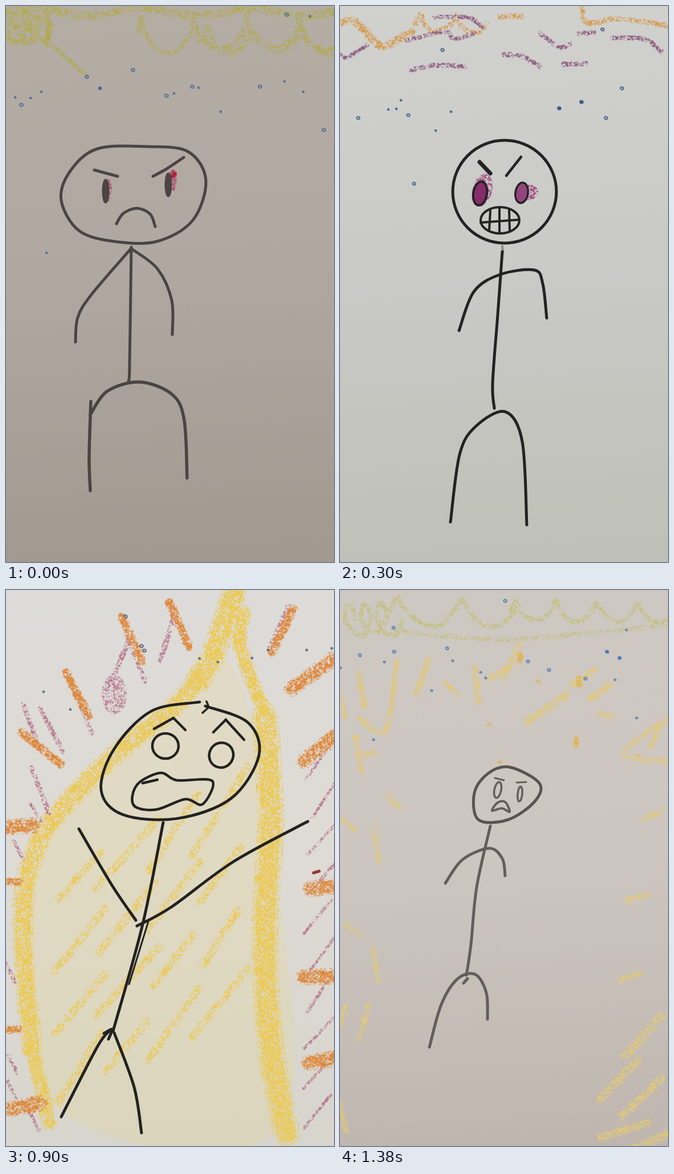
An HTML page with a canvas for the animation above (1.5 s loop, 576 by 973 pixels).

```html
<!DOCTYPE html>
<html lang="en">
<head>
<meta charset="utf-8">
<title>Angry stick figure</title>
<style>
html, body { margin: 0; width: 100%; height: 100%; overflow: hidden; background: #b0a8a0; }
canvas { position: absolute; left: 0; top: 0; width: 576px; height: 973px; opacity: 0; }
</style>
</head>
<body>
<script>
const W = 576, H = 973, HOLD = 300, TILE = 160;
let ctx;

// Seeded paper tooth, blurred once so that it tiles
let seed = 7;
const random = () => (seed = seed * 16807 % 2147483647) / 2147483647;
const raw = Array.from({ length: TILE * TILE }, random);
const tooth = raw.map((_, i) => {
  const x = i % TILE, y = (i - x) / TILE;
  let sum = 0;
  for (let dy = 0; dy < 3; dy++)
    for (let dx = 0; dx < 3; dx++)
      sum += raw[(y + dy) % TILE * TILE + (x + dx) % TILE];
  return sum / 9 - 0.5;
});

function grain(color, density) {
  const tile = document.createElement('canvas');
  tile.width = tile.height = TILE;
  const c = tile.getContext('2d');
  const image = c.createImageData(TILE, TILE);
  const rgb = [1, 3, 5].map(i => parseInt(color.slice(i, i + 2), 16));
  tooth.forEach((n, i) => {
    const alpha = Math.max(0, Math.min(1, density + n * 4));
    image.data.set([...rgb, alpha * 255], i * 4);
  });
  c.putImageData(image, 0, 0);
  return ctx.createPattern(tile, 'repeat');
}

const numbers = text => text.match(/-?[\d.]+/g).map(Number);

function pairs(text) {
  const n = numbers(text);
  return n.filter((_, i) => i % 2 === 0).map((x, i) => [x, n[i * 2 + 1]]);
}

// Smooth curve through points; a trailing z closes it
function curve(text) {
  const closed = text.endsWith('z');
  const p = pairs(text), size = p.length;
  const at = i => closed ? p[(i + size) % size] : p[Math.max(0, Math.min(size - 1, i))];
  const path = new Path2D();
  path.moveTo(...p[0]);
  for (let i = 0; i < (closed ? size : size - 1); i++) {
    const [a, b, c, d] = [at(i - 1), at(i), at(i + 1), at(i + 2)];
    path.bezierCurveTo(
      b[0] + (c[0] - a[0]) / 6, b[1] + (c[1] - a[1]) / 6,
      c[0] - (d[0] - b[0]) / 6, c[1] - (d[1] - b[1]) / 6, ...c);
  }
  if (closed) path.closePath();
  return path;
}

function ink(style, width, ...lines) {
  ctx.strokeStyle = style;
  ctx.lineWidth = width;
  ctx.lineCap = ctx.lineJoin = 'round';
  lines.forEach(line => ctx.stroke(curve(line)));
}

function wax(color, width, density, ...lines) {
  ink(grain(color, density * 0.3), width * 1.2, ...lines);
  ink(grain(color, density), width * 0.85, ...lines);
}

// Parallel crayon marks around the given centres
function hatch(color, width, density, length, degrees, centres) {
  const lines = pairs(centres).map(([x, y]) => {
    const a = (degrees + random() * 12 - 6) * Math.PI / 180;
    const dx = Math.cos(a) * length / 2, dy = Math.sin(a) * length / 2;
    return `${x - dx} ${y - dy} ${x + dx} ${y + dy}`;
  });
  wax(color, width, density, ...lines);
}

// Wavy crayon line that doubles back on itself
function scribble(color, width, density, x, y, length, height, waves) {
  const steps = waves * 6;
  const points = Array.from({ length: steps + 1 }, (_, i) => {
    const a = i / 6 * Math.PI * 2;
    const px = x + length * i / steps + Math.cos(a) * height * 0.5;
    return `${px} ${y - Math.sin(a) * height * (0.7 + random() * 0.5)}`;
  });
  wax(color, width, density, points.join(' '));
}

function oval(x, y, rx, ry, tilt, width, line, fill) {
  ctx.beginPath();
  ctx.ellipse(x, y, rx, ry, tilt, 0, 7);
  if (fill) { ctx.fillStyle = fill; ctx.fill(); }
  if (!width) return;
  ctx.strokeStyle = line;
  ctx.lineWidth = width;
  ctx.stroke();
}

const smudge = (color, density, x, y, rx, ry, tilt = 0) =>
  oval(x, y, rx, ry, tilt, 0, '', grain(color, density));

function dots(color, size, centres, fill = color + '40') {
  pairs(centres).forEach(([x, y]) => oval(x, y, size, size * 0.85, 0.4, 1.5, color, fill));
}

function paper(...colors) {
  const g = ctx.createLinearGradient(0, 0, 60, H);
  colors.forEach((c, i) => g.addColorStop(i / (colors.length - 1), c));
  ctx.fillStyle = g;
  ctx.fillRect(0, 0, W, H);
}

function frown() {
  const pen = '#4a4443', green = '#b0aa50', blue = '#49699c';
  paper('#b4ada4', '#b0a8a0', '#a29a91');
  scribble(green, 14, 0.28, 0, 10, W, 8, 3);
  scribble(green, 12, 0.45, 0, 36, 66, 25, 3);
  scribble(green, 9, 0.28, 215, 45, 370, 34, 4);
  scribble(green, 12, 0.18, 330, 60, 250, 22, 3);
  wax(green, 12, 0.5, '70 0 74 66');
  wax(green, 7, 0.45, '80 68 142 122');
  dots(blue, 3.2, '142 124 223 112 282 157 327 141 27 173 446 141 558 217 493 15');
  dots(blue, 1.6, '16 160 43 161 62 150 295 153 338 143 377 185 489 132 522 150 534 18 71 432');
  dots(blue, 2.8, '165 144', blue);
  ink(pen, 5, '160 250 250 246 320 255 351 305 328 375 265 412 190 412 128 393 97 340 112 290z');
  ink(pen, 5, '155 287 196 298', '258 298 282 285 312 265', '194 381 206 363 230 354 253 364 262 386');
  smudge('#b04a6c', 0.5, 180, 322, 6, 20);
  smudge('#b04a6c', 0.5, 294, 305, 6, 18);
  smudge('#a8203f', 0.95, 294, 294, 6, 8);
  oval(175, 324, 5, 20, 0, 3, pen, pen);
  oval(285, 313, 5, 20, 0, 3, pen, pen);
  ink(pen, 5, '220 422 217 630 215 656', '220 424 150 505 126 545 122 588', '222 426 266 460 291 515 292 575');
  ink(pen, 5.5, '149 692 146 790 148 848', '148 715 178 674 235 658 292 680 313 725 318 826');
}

function teeth() {
  const pen = '#222322', purple = '#8d5a80', orange = '#d59a4e', blue = '#39608f';
  paper('#d1d1ce', '#c9cac6', '#bfc0b8');
  wax(orange, 13, 0.55, '0 30 22 25 45 45 75 70 125 45');
  scribble(orange, 9, 0.4, 125, 32, 125, 14, 2);
  wax(orange, 9, 0.4, '280 18 320 18', '425 0 435 30 490 22 576 35');
  wax(purple, 7, 0.5, '0 85 12 90 48 68', '118 60 185 45 200 58 235 48', '165 20 225 20 250 38');
  wax(purple, 8, 0.45, '125 112 165 104 220 106', '288 85 320 88 350 106', '392 102 432 101');
  wax(purple, 8, 0.45, '352 48 385 72 405 66', '420 48 445 46', '478 55 535 58 565 80');
  dots(blue, 2.9, '180 77 461 41 495 144 467 196 32 196 120 191 130 311');
  dots(blue, 1.6, '107 165 85 181 99 180 195 185 168 218');
  dots(blue, 3.2, '424 168 385 179', blue);
  oval(289, 325, 91, 90, 0, 5, pen);
  ink(pen, 7, '245 273 264 293');
  ink(pen, 4.5, '318 264 292 297');
  smudge('#a0407c', 0.5, 250, 322, 17, 29, 0.25);
  smudge('#a0407c', 0.5, 330, 326, 18, 14);
  oval(246, 328, 12, 21, 0.15, 4, pen, '#862d6a');
  oval(319, 327, 11, 18, 0.15, 3.5, pen, '#94457f');
  oval(281, 375, 34, 23, 0, 4, pen);
  ink(pen, 4, '264 358 262 392', '280 353 280 397', '297 357 298 394', '247 379 314 374');
  ink('#8b8b88', 4, '285 420 286 430');
  ink(pen, 5, '285 430 277 540 268 660 271 704', '209 568 235 500 281 470 341 462 356 486 363 546');
  ink(pen, 5, '194 903 210 785 238 736 290 710 320 762 328 908');
}

function spark() {
  const pen = '#252522', orange = '#de9a42', purple = '#ae6684', blue = '#434f6d', sun = '#edc83a';
  paper('#d9d8d5', '#d6d6d2', '#c6c6bf');
  hatch(orange, 9, 0.55, 230, -51, '160 105');
  hatch(orange, 9, 0.55, 190, -84, '95 95');
  hatch(orange, 9, 0.55, 160, 75, '50 142 35 185');
  hatch(orange, 9, 0.45, 110, -62, '25 245 225 120');
  wax(orange, 12, 0.6, '280 40 195 120 112 240', '190 165 220 150 275 160', '225 205 222 170 262 80');
  wax(orange, 11, 0.6, '455 60 432 148', '295 135 375 90', '530 75 500 125 455 148');
  hatch(orange, 8, 0.55, 75, -45, '355 160 560 222 435 352');
  hatch(orange, 8, 0.55, 90, 75, '553 142');
  hatch(orange, 9, 0.5, 24, 85, '273 326 320 342 214 352 362 314');
  hatch(orange, 10, 0.45, 40, -25, '490 234');
  wax(orange, 6, 0.4, '38 340 38 450 80 560 20 500 0 460', '188 525 230 492 298 490', '170 560 150 620 168 662');
  wax(orange, 10, 0.6, '432 545 435 605 355 662');
  hatch(purple, 10, 0.5, 75, -62, '340 105 403 137');
  hatch(purple, 9, 0.5, 75, 88, '344 38 27 507');
  hatch(purple, 9, 0.5, 45, -75, '268 75 179 135 193 195 107 95 94 255 60 250 499 120 550 310');
  hatch(purple, 7, 0.5, 75, -75, '551 230');
  wax(purple, 16, 0.5, '25 295 45 325 75 360');
  smudge(sun, 0.85, 283, 564, 50, 53);
  smudge(sun, 0.4, 283, 562, 57, 57);
  dots(blue, 3.3, '246 104 152 134 157 142 80 194 554 178 565 180');
  dots(blue, 1.8, '50 12 106 27 83 54 172 222 21 163 285 165 347 173 354 204');
  dots(blue, 1.8, '331 117 413 214 472 25 530 11 530 178 541 163 168 175');
  ink(pen, 5.5, '325 391 374 415 350 454 300 465 244 449 250 407z');
  wax('#5b2a45', 7, 0.65, '263 430 285 416');
  ink('#4a2c3c', 3, '278 421 302 425');
  smudge('#451f31', 1, 336, 436, 13, 9, -0.3);
  ink(pen, 4, '268 460 296 441 318 460');
  ink(pen, 2.5, '285 450 287 460', '297 443 297 460', '280 456 312 456');
  ink('#77766f', 5, '289 470 284 484');
  ink(pen, 5, '284 484 266 545 247 692', '200 580 180 595 150 602 158 565 268 523');
  ink(pen, 5, '268 523 340 550 373 578 362 603 306 597', '130 818 145 725 178 671 220 666 247 692');
  ink(pen, 5, '247 692 275 672 328 670 345 710 317 822', '126 815 130 819 138 812');
}

function blaze() {
  const pen = '#222220', yellow = '#ebc955', orange = '#de883c', purple = '#b97890', blue = '#4b5b80';
  paper('#dddbd9', '#dedbd4', '#d7d5cd');
  ctx.fillStyle = '#e8d27a30';
  ctx.fill(curve('390 120 460 400 480 940 80 900 45 500 300 210z'));
  for (let i = 0; i < 16; i++) {
    const col = i % 4, row = (i - col) / 4;
    hatch(yellow, 13, 0.3, 110 + random() * 80, -52, `${130 + col * 82} ${500 + row * 112 - col * 38}`);
  }
  wax(yellow, 38, 0.75, '400 5 365 110 335 160');
  wax(yellow, 32, 0.7, '335 160 290 210 190 290 70 420 30 560 45 800');
  wax(yellow, 24, 0.75, '45 800 76 932', '417 40 412 100 452 210');
  wax(yellow, 40, 0.78, '455 220 465 400 455 600 465 800 493 950');
  for (let y = 300; y < H; y += 68)
    hatch(purple, 5, 0.5, 75, -52, `${545 + random() * 14} ${y}`);
  hatch(purple, 9, 0.42, 80, -70, '283 85 198 130 480 65');
  hatch(purple, 8, 0.4, 85, 65, '45 240 80 245 135 210 60 350 228 120');
  hatch(purple, 6, 0.4, 35, 60, '53 390 22 455 8 670 12 830 10 875 50 930');
  smudge(purple, 0.35, 190, 183, 22, 35);
  hatch(orange, 14, 0.8, 85, 67, '221 86 125 182 304 60');
  hatch(orange, 14, 0.8, 88, 40, '62 277');
  hatch(orange, 15, 0.8, 85, -68, '485 72');
  hatch(orange, 23, 0.72, 90, -40, '538 147 558 272');
  hatch(orange, 24, 0.72, 50, -6, '560 520 548 677 557 823 22 414 35 903');
  hatch(orange, 13, 0.8, 22, 0, '12 510 12 769');
  ink('#963334', 5, '540 495 550 492');
  dots(blue, 3, '238 98 243 106 210 46');
  dots(blue, 1.7, '340 120 372 126 432 119 460 105 528 105 572 102 66 178 113 209');
  ink(pen, 4.8, '350 203 425 232 444 290 395 365 300 400 205 393 167 350 190 278 255 212 340 196');
  ink(pen, 3.5, '352 195 355 205 345 215');
  ink(pen, 4.5, '260 243 294 224', '294 224 315 245', '364 249 386 227', '386 227 418 262');
  oval(280, 273, 23, 22, 0, 4.5, pen);
  oval(378, 289, 21, 22, 0.5, 4.5, pen);
  ink(pen, 4.5, '222 360 235 336 272 320 300 333 362 334 345 375 315 366 265 384 228 380z', '240 338 266 332');
  ink(pen, 5, '276 407 240 585 188 772', '128 418 185 515 228 578', '530 405 400 475 290 555 230 588');
  ink(pen, 3, '250 580 216 690');
  ink(pen, 5, '183 770 160 800 97 922', '190 775 225 870 238 950', '172 776 186 769 180 786');
}

function calm() {
  const pen = '#635d5b', green = '#c2c07c', yellow = '#e2c976', amber = '#e0b550', blue = '#4f7bb3';
  paper('#cec8c3', '#cdc6c0', '#bfb7af');
  scribble(green, 8, 0.45, 10, 52, 85, 30, 3);
  scribble(green, 8, 0.42, 75, 38, 220, 26, 2);
  scribble(green, 8, 0.42, 290, 38, 286, 18, 4);
  wax(green, 8, 0.22, '100 72 300 86 576 62');
  hatch(yellow, 12, 0.5, 60, -65, '145 152 300 125');
  hatch(yellow, 13, 0.5, 85, -31, '363 207');
  hatch(yellow, 12, 0.5, 42, -34, '428 153 458 178 280 145');
  hatch(yellow, 11, 0.5, 60, 82, '38 175 32 288 240 167');
  wax(yellow, 10, 0.5, '100 125 80 245 35 225', '30 290 62 285', '457 218 476 220');
  hatch(yellow, 9, 0.42, 58, 75, '64 445 63 657 4 920 2 195');
  hatch(yellow, 9, 0.42, 30, 40, '94 371 14 409 22 594 195 172');
  hatch(yellow, 9, 0.42, 65, -78, '42 757 1 760');
  wax(yellow, 10, 0.45, '576 225 500 285 576 300', '560 240 545 275');
  hatch(yellow, 10, 0.45, 36, -20, '549 394 522 538 510 677');
  hatch(yellow, 14, 0.5, 95, -42, '533 780 490 857 530 888');
  hatch(yellow, 14, 0.5, 85, -22, '500 945 550 963');
  hatch(amber, 10, 0.8, 12, 85, '415 267 316 118 420 160');
  hatch(amber, 6, 0.6, 4, 30, '349 160 280 301 523 290 262 236');
  dots(blue, 2.8, '290 19 94 66 95 108 35 114 188 102 330 125 367 140 431 155');
  dots(blue, 1.8, '78 126 1 136 198 124 161 176 247 144 256 154 483 157 503 70 521 224 59 262');
  dots(blue, 2.8, '469 108 491 119', blue);
  ink('#5a5351', 5, '298 310 350 338 342 370 295 402 243 402 236 355 260 321z');
  oval(277, 350, 6, 14, 0.2, 3.5, pen);
  oval(316, 357, 4, 13, 0.1, 3.5, pen);
  ink(pen, 3, '272 329 288 333', '310 337 327 336');
  ink(pen, 4, '267 386 277 372 290 371 298 388 284 382z');
  ink(pen, 5, '264 413 240 520 230 620 222 674', '185 513 215 472 262 452 285 470 290 500');
  ink(pen, 5, '157 800 178 725 207 680 238 673 257 705 259 751', '217 688 224 680');
}

[frown, teeth, spark, blaze, calm].forEach((draw, i, scenes) => {
  const canvas = document.createElement('canvas');
  canvas.width = W;
  canvas.height = H;
  ctx = canvas.getContext('2d');
  draw();
  document.body.append(canvas);
  const duration = HOLD * scenes.length;
  canvas.animate([
    { opacity: 1, offset: 0, easing: 'step-end' },
    { opacity: 0, offset: 1 / scenes.length },
    { opacity: 0, offset: 1 }
  ], { duration, delay: i * HOLD - duration, iterations: Infinity });
});
</script>
</body>
</html>
```
